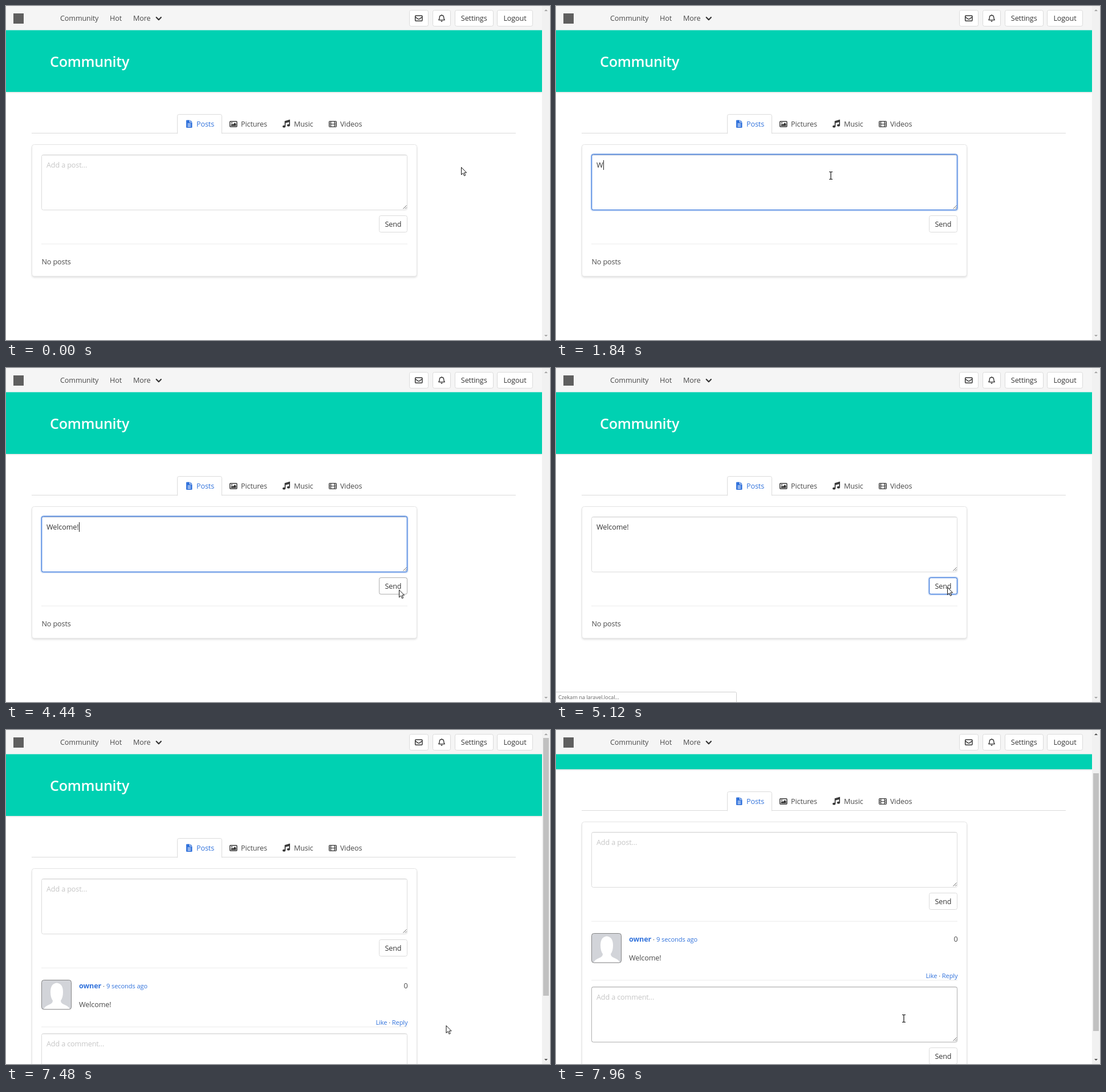
An HTML page that plays this animation: 954x587 px, repeating every 8000 ms.

```html
<!DOCTYPE html>
<html lang="en">
<head>
<meta charset="utf-8">
<title>Community</title>
<style>
html, body { margin: 0; width: 100%; height: 100%; overflow: hidden; background: #fff; }
svg { display: block; width: 954px; height: 587px; }
text { font: 12.6px "Open Sans", "Noto Sans", sans-serif; letter-spacing: -.01em; fill: #4a4a4a; white-space: pre; }
.mid { text-anchor: middle; fill: #363636; }
.end { text-anchor: end; }
.small { font-size: 11.1px; }
.hint { fill: #c6c6c6; }
.typed { fill: #363636; }
.link, .link text { fill: #3273dc; }
.name { font-weight: 700; fill: #3273dc; }
.title { font-size: 25.1px; font-weight: 600; fill: #fff; }
.box { fill: #fff; stroke: #dbdbdb; }
.card { fill: #fff; stroke: #e4e4e4; filter: drop-shadow(0 2px 1.5px rgba(10,10,10,.12)); }
.rule { fill: #f1f1f1; }
.hover { fill: none; stroke: #b0b0b0; }
.ring { fill: none; stroke: #3273dc; stroke-opacity: .25; stroke-width: 3.5; }
.focus { fill: none; stroke: #3273dc; }
.line { fill: none; stroke: #363636; stroke-width: 1.5; stroke-linejoin: round; stroke-linecap: round; }

/* One loop is 8 s, so 1% is 80 ms. */
.on { animation: 8s step-end infinite; }
.move { animation: 8s linear infinite; }

#empty { animation-name: empty; }
#post { animation-name: post; }
#own { animation-name: own; }
#thread, #thumb { animation-name: thread; }
#hint { animation-name: hint; }
#typed { animation-name: typed; }
#caret { animation-name: caret; }
#type { animation-name: type; }
#areaHover { animation-name: areaHover; }
#areaFocus { animation-name: areaFocus; }
#sendHover { animation-name: sendHover; }
#sendFocus { animation-name: sendFocus; }
#replyHover { animation-name: replyHover; }
#status { animation-name: status; }
#up { animation-name: up; }
#down { animation-name: down; }
#arrow { animation-name: arrow; }
#beam { animation-name: beam; }
#cursor { animation-name: cursor; }
#page { animation-name: page; }
#slide { animation-name: slide; }

@keyframes empty { 0% { visibility: visible } 65.5%, 100% { visibility: hidden } }
@keyframes post { 0% { visibility: hidden } 65.5%, 100% { visibility: visible } }
@keyframes own { 0%, 82% { visibility: hidden } 65.5% { visibility: visible } 100% { visibility: hidden } }
@keyframes thread { 0% { visibility: hidden } 82%, 100% { visibility: visible } }
@keyframes hint { 0%, 65.5%, 100% { visibility: visible } 23% { visibility: hidden } }
@keyframes typed { 0%, 65.5%, 100% { visibility: hidden } 23% { visibility: visible } }
@keyframes caret {
  0%, 13.5%, 46.5%, 59%, 100% { visibility: hidden }
  7.5%, 20%, 53% { visibility: visible }
}
@keyframes type {
  0% { transform: none }
  23% { transform: translateX(12px) }
  28% { transform: translateX(19px) }
  31% { transform: translateX(22px) }
  32% { transform: translateX(28px) }
  33% { transform: translateX(35px) }
  35.5% { transform: translateX(47px) }
  36.5% { transform: translateX(54px) }
  40.5%, 100% { transform: translateX(57px) }
}
@keyframes areaHover { 0%, 7.5%, 100% { visibility: hidden } 3% { visibility: visible } }
@keyframes areaFocus { 0%, 59%, 100% { visibility: hidden } 7.5% { visibility: visible } }
@keyframes sendHover { 0%, 59%, 100% { visibility: hidden } 53.5% { visibility: visible } }
@keyframes sendFocus { 0%, 65.5%, 100% { visibility: hidden } 59% { visibility: visible } }
@keyframes replyHover { 0% { visibility: hidden } 95.7%, 100% { visibility: visible } }
@keyframes status { 0%, 66.5%, 100% { visibility: hidden } 63% { visibility: visible } }
@keyframes up { 0% { fill: #a3a3a3 } 96%, 100% { fill: #505050 } }
@keyframes down { 0% { fill: #a3a3a3 } 82%, 100% { fill: #505050 } }
@keyframes arrow { 0%, 52% { visibility: visible } 3%, 95.7%, 100% { visibility: hidden } }
@keyframes beam { 0%, 52% { visibility: hidden } 3%, 95.7%, 100% { visibility: visible } }
@keyframes cursor {
  0% { transform: translate(798px, 283px) }
  1% { transform: translate(798px, 283px); animation-timing-function: ease-in-out }
  7%, 48% { transform: translate(482px, 298px); animation-timing-function: ease-in-out }
  55% { transform: translate(690px, 391px) }
  57%, 65% { transform: translate(686px, 385px); animation-timing-function: ease-in-out }
  71.5%, 77.49% { transform: translate(840px, 400px) }
  77.5%, 82% { transform: translate(841px, 400.5px); animation-timing-function: ease-in-out }
  91.5%, 94.5% { transform: translate(771.5px, 519px); animation-timing-function: ease-in-out }
  97.5%, 100% { transform: translate(610px, 507px) }
}
@keyframes page {
  0%, 95.5% { transform: none; animation-timing-function: ease-in-out }
  99.5%, 100% { transform: translateY(-82px) }
}
@keyframes slide {
  0%, 95.5% { transform: none; animation-timing-function: ease-in-out }
  99.5%, 100% { transform: translateY(62px) }
}
</style>
</head>
<body>
<svg viewBox="0 0 954 587">
  <defs>
    <g id="area">
      <rect class="box" x="62.5" y="261.5" width="641" height="97" rx="3"/>
      <path d="M64 262.5H702" stroke="#0a0a0a" stroke-opacity=".08"/>
      <path d="M696.5 356.5l6-6M700 356.5l2.5-2.5" stroke="#666"/>
    </g>
    <g id="send">
      <rect class="box" x="654.5" y="368.5" width="49" height="29" rx="3"/>
      <text class="mid" x="679" y="388">Send</text>
    </g>
  </defs>
  <rect width="954" height="587" fill="#fff"/>

  <g id="page" class="move">
    <rect y="42" width="940" height="109" fill="#00d1b2" style="filter:drop-shadow(0 1px 1px rgba(10,10,10,.15))"/>
    <text class="title" x="77" y="107">Community</text>

    <path d="M45 223.5H894" stroke="#dbdbdb"/>
    <path d="M300.5 224.5V193.5q0-3 3-3H375.500q3 0 3 3V224.5" fill="#fff" stroke="#dbdbdb"/>
    <rect x="301" y="222" width="77" height="3" fill="#fff"/>
    <text class="link" x="334" y="212">Posts</text>
    <text x="412" y="212">Pictures</text>
    <text x="505" y="212">Music</text>
    <text x="586" y="212">Videos</text>
    <path d="M317 200.500h5v4h4.500v8.500q0 1-1 1h-8.500q-1 0-1-1v-11.500q0-1 1-1zM323 200.500l3.500 3.300h-3.500z" fill="#3273dc"/>
    <path d="M318.500 207h5.500M318.500 209.300h5.500M318.500 211.600h5.500" stroke="#fff"/>
    <rect class="line" x="392.700" y="202.700" width="12.200" height="9.600" rx="1"/>
    <path d="M394.500 210.800v-2l2-2 1.500 1.500 3.300-3.300 2.200 2.200v3.600z" fill="#363636"/>
    <circle cx="396" cy="205.300" r="1.100" fill="#363636"/>
    <path d="M489.500 211.500v-8.700l7.700-2.200v9" fill="none" stroke="#363636" stroke-width="1.700"/>
    <path d="M489 203.500l9-2.600v2.600l-9 2.600z" fill="#363636"/>
    <ellipse cx="487.600" cy="211.800" rx="2.700" ry="2" fill="#363636"/>
    <ellipse cx="495.400" cy="209.800" rx="2.700" ry="2" fill="#363636"/>
    <rect x="566.700" y="202.700" width="12.600" height="9.600" rx="1" fill="none" stroke="#363636" stroke-width="1.300"/>
    <path d="M569.700 203v9M576.300 203v9M569.700 207.500h6.600M567 206h2.500M567 209h2.500M576.500 206h2.500M576.500 209h2.500" stroke="#363636" stroke-width="1.200"/>

    <g id="empty" class="on">
      <rect class="card" x="45.5" y="243.500" width="675" height="231.500" rx="4"/>
      <text x="62.500" y="454">No posts</text>
    </g>
    <g id="own" class="on">
      <rect class="card" x="45.5" y="243.500" width="675" height="294.500" rx="4"/>
      <text class="small" x="176" y="454"><tspan class="link">less than 1 second ago</tspan></text>
      <text class="small end" x="704.500" y="517.500"><tspan class="link">Reply</tspan> · <tspan class="link">Edit</tspan> · <tspan class="link">Delete</tspan></text>
    </g>
    <g id="thread" class="on">
      <rect class="card" x="45.5" y="243.500" width="675" height="490" rx="4"/>
      <text class="small" x="176" y="454"><tspan class="link">9 seconds ago</tspan></text>
      <text class="small end" x="704.500" y="517.500"><tspan class="link">Like</tspan> · <tspan class="link">Reply</tspan></text>
      <rect class="rule" x="62" y="521" width="642" height="1.500"/>
      <g transform="translate(0 272)">
        <use href="#area"/>
        <text class="hint" x="71" y="284">Add a comment...</text>
        <use href="#send"/>
        <rect id="replyHover" class="hover on" x="62.5" y="261.500" width="641" height="97" rx="3"/>
      </g>
    </g>
    <g id="post" class="on">
      <rect x="62.500" y="439.500" width="52" height="51.500" rx="4" fill="#d2d4d9"/>
      <path d="M66 490.500q2-5 10-8 6-2 6-7-4-5-4-15 0-15 11-16 11 1 11 16 0 10-4 15 0 5 6 7 8 3 10 8z" fill="#fff"/>
      <rect x="62.500" y="439.500" width="52" height="51.500" rx="4" fill="none" stroke="#858585"/>
      <text class="name" x="128" y="454">owner</text>
      <text class="small" x="170" y="454">·</text>
      <text class="end" x="704.500" y="454">0</text>
      <text x="128" y="486.500">Welcome!</text>
    </g>

    <use href="#area"/>
    <text id="typed" class="typed on" x="71" y="284">Welcome!</text>
    <g id="type" class="on">
      <rect x="71.500" y="268" width="70" height="22" fill="#fff"/>
      <path id="caret" class="on" d="M71.500 271V288" stroke="#222"/>
    </g>
    <text id="hint" class="hint on" x="71" y="284">Add a post...</text>
    <rect id="areaHover" class="hover on" x="62.500" y="261.500" width="641" height="97" rx="3"/>
    <g id="areaFocus" class="on">
      <rect class="ring" x="62" y="261" width="642" height="98" rx="3.500"/>
      <rect class="focus" x="62.500" y="260.500" width="641" height="98" rx="3"/>
      <path d="M71.500 271V288" stroke="none"/>
    </g>
    <use href="#send"/>
    <rect id="sendHover" class="hover on" x="654.500" y="368.500" width="49" height="29" rx="3"/>
    <g id="sendFocus" class="on">
      <rect class="ring" x="654" y="368" width="50" height="30" rx="3.500"/>
      <rect class="focus" x="654.500" y="368.500" width="49" height="29" rx="3"/>
    </g>
    <rect class="rule" x="62" y="417.500" width="642" height="1.500"/>
  </g>

  <rect width="940" height="42.500" fill="#f5f5f5"/>
  <rect x="13" y="13" width="18" height="18" fill="#5f5f5f"/>
  <text x="95" y="26">Community</text>
  <text x="182" y="26">Hot</text>
  <text x="223" y="26">More</text>
  <path class="line" d="M263.700 20l4.100 4.200 4.100-4.200" style="stroke-width:2.200"/>
  <rect class="box" x="707.500" y="7.500" width="33" height="28" rx="3"/>
  <rect class="box" x="748.500" y="7.500" width="31" height="28" rx="3"/>
  <rect class="box" x="787.500" y="7.500" width="67" height="28" rx="3"/>
  <rect class="box" x="861.500" y="7.500" width="62" height="28" rx="3"/>
  <rect class="line" x="717.700" y="17" width="12.200" height="9.200" rx="1"/>
  <path class="line" d="M718 19.500l4.700 3.400q1.100.7 2.200 0l4.700-3.400"/>
  <path class="line" d="M758.800 24.600q1.500-1.400 1.500-4.600 0-3.300 3.700-3.700 3.700.4 3.700 3.700 0 3.200 1.500 4.600zM764 15.600v.4" style="stroke-width:1.400"/>
  <path d="M762.200 26h3.600q-.3 1.800-1.800 1.800t-1.800-1.800z" fill="#363636"/>
  <text class="mid" x="820.700" y="26">Settings</text>
  <text class="mid" x="892.500" y="26">Logout</text>

  <rect x="940" width="14" height="587" fill="#f1f1f1"/>
  <path id="up" class="on" d="M944 9l3-3 3 3z"/>
  <path id="down" class="on" d="M944 578l3 3 3-3z"/>
  <g id="slide" class="move">
    <rect id="thumb" class="on" x="942" y="14" width="10" height="453" fill="#c1c1c1"/>
  </g>

  <g id="status" class="on">
    <path d="M-.5 588V569.500H314.500q2 0 2 2V588z" fill="#fff" stroke="#d0d0d0"/>
    <text x="4" y="582" style="font-size:9.400px;fill:#666">Czekam na laravel.local...</text>
  </g>

  <g id="cursor" class="move">
    <path id="arrow" class="on" d="M.5.500V13.500L3.600 10.700 5.600 15.400 7.700 14.500 5.700 9.900H9.600z" fill="#fff" stroke="#111"/>
    <path id="beam" class="on" d="M-3-6.500h2q1 0 1 1 0-1 1-1h2M0-5.500v11M-3 6.500h2q1 0 1-1 0 1 1 1h2" fill="none" stroke="#111" stroke-width="1.200"/>
  </g>
</svg>
</body>
</html>
```
